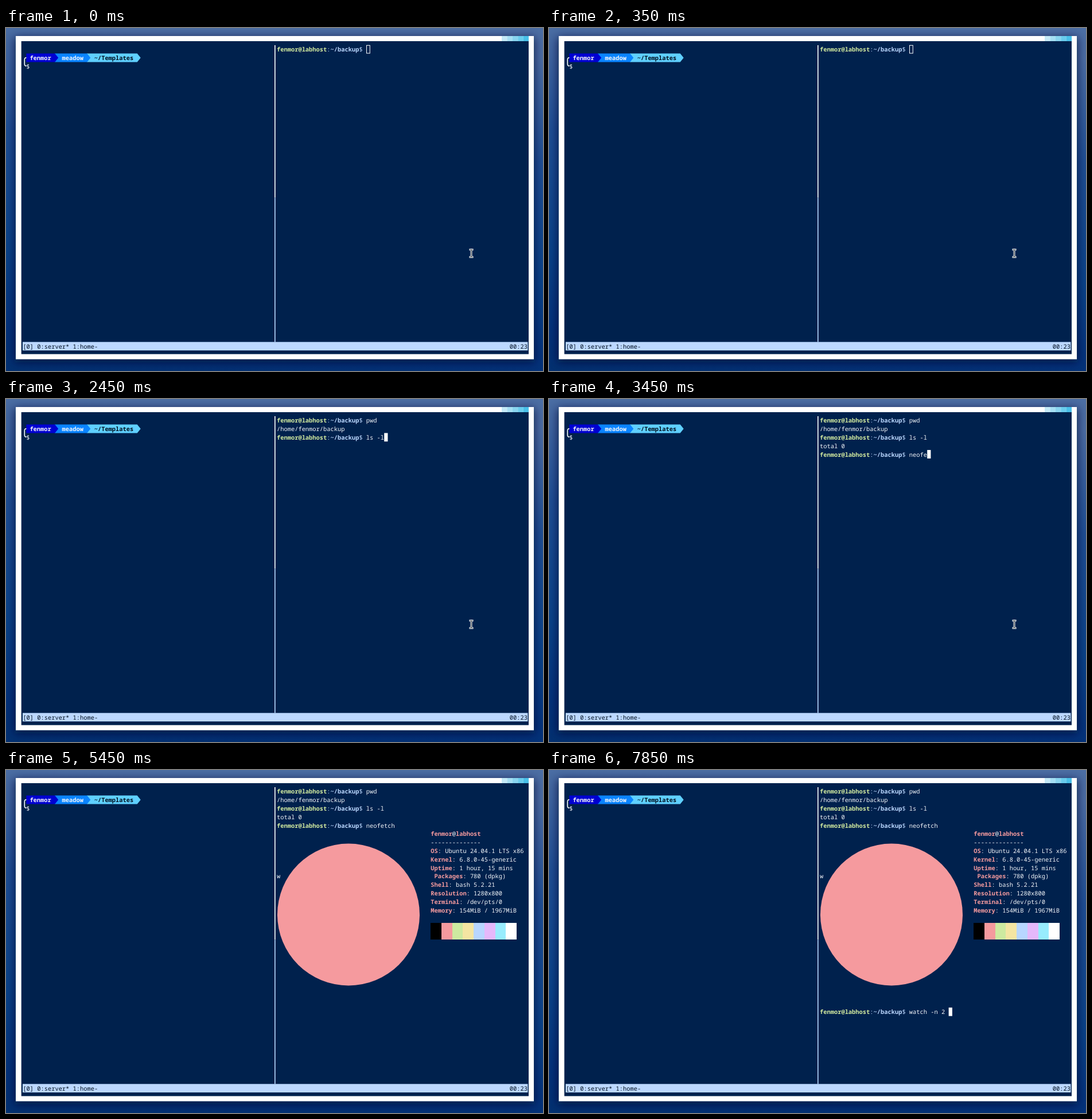
Write an HTML page that moves like this. It is 936x599 px and loops after 8000 ms.

```html
<!DOCTYPE html>
<html lang="en">
<head>
<meta charset="utf-8">
<title>Terminal session</title>
<style>
html, body { margin: 0; width: 100%; height: 100%; overflow: hidden; background: #0a3a80; }
svg { display: block; width: 936px; height: 599px; }
text { white-space: pre; text-rendering: geometricPrecision; }
.mono { font: 10.4px "Noto Sans Mono", monospace; fill: #f4f6fa; }
.b { font-weight: 700; }
.dark { fill: #001020; }
.small { font-size: 5.8px; }
.ui { font: 10.46px "Noto Sans", sans-serif; text-anchor: middle; fill: #46525c; }
</style>
</head>
<body>
<svg viewBox="0 0 936 599" xmlns="http://www.w3.org/2000/svg">
  <defs>
    <linearGradient id="sky" x1=".1" x2="0" y2="1">
      <stop offset="0" stop-color="#4c6ea4"/>
      <stop offset=".3" stop-color="#1f4f94"/>
      <stop offset=".65" stop-color="#0a4388"/>
      <stop offset=".88" stop-color="#04327a"/>
      <stop offset="1" stop-color="#033070"/>
    </linearGradient>
    <filter id="soft" x="-10%" y="-10%" width="120%" height="120%"><feGaussianBlur stdDeviation="8"/></filter>
  </defs>

  <rect width="936" height="599" fill="url(#sky)"/>
  <rect x="15" y="16" width="907" height="568" fill="#001030" opacity=".7" filter="url(#soft)"/>
  <rect x="17" y="14" width="903" height="564.5" fill="#fff"/>
  <g id="strip"></g>

  <g id="term">
    <rect x="26.7" y="23" width="884.3" height="546.5" fill="#00214d"/>
    <rect x="468" y="30" width="1.6" height="266.5" fill="#fff"/>
    <rect x="468" y="296.5" width="1.6" height="252" fill="#bcd8ff"/>
    <path d="M141 44.6h87.7l6 7.4-6 7.4H141Z" fill="#5fd0ff"/>
    <path d="M85 44.6h56.3l6 7.4-6 7.4H85Z" fill="#0a84ff"/>
    <path d="M35.3 44.6h49.9l6 7.4-6 7.4H35.3Z" fill="#0000d2"/>
    <path d="M35.5 51.8q-3.2 0-3.2 3.6v7.4q0 3.6 3.2 3.6" fill="none" stroke="#fff" stroke-width="1.6"/>
    <g class="mono">
      <text class="b" x="41.4" y="56.2">fenmor</text>
      <text class="b" x="97.5" y="56.2">meadow</text>
      <text class="b dark" x="153.7" y="56.2">~/Templates</text>
      <text x="35.2" y="71">$</text>
    </g>
    <rect x="29" y="548.3" width="880.5" height="14.8" fill="#bcd8ff"/>
    <g class="mono dark">
      <text x="29.3" y="560">[0] 0:server* 1:home-</text>
      <text x="877.8" y="560">00:23</text>
    </g>
    <g id="pane" class="mono"></g>
  </g>

  <g id="switcher">
    <rect x="17" y="14" width="903" height="564.5" rx="2" fill="#4dbfe9" opacity=".5"/>
    <rect x="18" y="15" width="901" height="562.5" rx="2" fill="none" stroke="#4dbfe9" stroke-width="2"/>
    <rect x="326.8" y="193.5" width="520" height="286.5" rx="7" fill="#fff" stroke="#4db5dd"/>
    <rect x="338" y="205" width="247" height="247" fill="#fcfcfd"/>
    <rect x="588" y="205" width="247.5" height="247" rx="2" fill="#4dbfe9"/>
    <rect x="386" y="208" width="149.3" height="225" fill="#00214d"/>
    <g id="log" class="mono small"></g>
    <rect x="386" y="424" width="3.6" height="8.2" fill="#fff"/>
    <use href="#term" transform="translate(599 251) scale(.2545) translate(-27 -23)"/>
    <rect x="446.5" y="400" width="29" height="29" fill="#0c0a0c"/>
    <rect x="697" y="400" width="29" height="29" fill="#0c0a0c"/>
    <g class="ui">
      <text x="461" y="446">kitty</text>
      <text x="711.5" y="446" style="fill:#fff">kitty</text>
      <text x="586" y="465.5">recordmydesktop --x=210 --y=113 --width=1195 --height=757</text>
    </g>
  </g>

  <g id="pointer" fill="none" stroke-linecap="square">
    <path id="beam" d="M809 387h1.2l.8.8.8-.8h1.2M811 388v11M809 400h1.2l.8-.8.8.8h1.2" stroke="#fff" stroke-width="3"/>
    <path d="M809 387h1.2l.8.8.8-.8h1.2M811 388v11M809 400h1.2l.8-.8.8.8h1.2" stroke="#101820"/>
  </g>
</svg>
<script>
const LOOP = 8000, CELL = 6.24, LINE = 14.81, LEFT = 472, TOP = 29.8;
const SWITCHER_IN = 200, SWITCHER_OUT = 350, FOCUS = 450, POINTER_OUT = 3850;
const PINK = '#f59a9e', LIME = '#d3eba0', SKY = '#bcd8ff';
const USER = 'fenmor', HOST = 'labhost';
const $ = id => document.getElementById(id);

const colX = col => LEFT + col * CELL;
const rowY = row => TOP + row * LINE;
const rect = (x, y, w, h, fill, more = '') =>
  `<rect x="${x}" y="${y}" width="${w}" height="${h}" fill="${fill}" ${more}/>`;
const span = (s, color, bold) =>
  `<tspan ${bold ? 'class="b"' : ''} style="fill:${color}">${s}</tspan>`;
const line = (col, row, body) => `<text x="${colX(col)}" y="${rowY(row) + 11.5}">${body}</text>`;

const PROMPT = span(`${USER}@${HOST}`, LIME, true) + span(':', SKY) +
  span('~/backup', SKY, true) + span('$ ', SKY);
const PROMPT_LENGTH = USER.length + HOST.length + 12;

const commands = [
  { row: 0, at: 0, text: 'pwd', keys: [1000, 1100, 1200], enter: 1550 },
  { row: 2, at: 1600, text: 'ls -l', keys: [1800, 1900, 2050, 2250, 2450], enter: 2700 },
  { row: 4, at: 2750, text: 'neofetch', keys: [3150, 3200, 3300, 3350, 3450, 3500, 3550, 3650], enter: 3750 },
  { row: 26, at: 5600, text: 'watch -n 2 ', enter: Infinity,
    keys: [5850, 6150, 6250, 6400, 6600, 6800, 6950, 7150, 7200, 7600, 7800] },
];

const info = (row, at, label, value, shift = 0) =>
  ({ at, draw: line(43 + shift, row, span(label, PINK, true) + ': ' + value) });

const palette = ['#000', PINK, '#cdeaa0', '#f4e5a2', '#b8d6ff', '#e5b8fa', '#98ecfd', '#fff'];
const swatch = (color, i) =>
  rect(colX(43 + 3 * i), rowY(16), 3 * CELL, 2 * LINE, color, 'shape-rendering="crispEdges"');

const outputs = [
  { at: 1600, draw: line(0, 1, `/home/${USER}/backup`) },
  { at: 2700, draw: line(0, 3, 'total 0') },
  { at: 3850, draw: `<circle cx="597" cy="252.5" r="124" fill="${PINK}"/>` },
  { at: 4150, draw: line(43, 5, span(USER, PINK, true) + '@' + span(HOST, PINK, true)) },
  { at: 4200, draw: line(43, 6, '-'.repeat(USER.length + HOST.length + 1)) },
  info(7, 4300, 'OS', 'Ubuntu 24.04.1 LTS x86'),
  info(8, 4400, 'Kernel', '6.8.0-45-generic'),
  info(9, 4550, 'Uptime', '1 hour, 15 mins'),
  { at: 4850, draw: line(0, 10, 'w') },
  info(10, 5000, 'Packages', '780 (dpkg)', 1),
  info(11, 5100, 'Shell', 'bash 5.2.21'),
  info(12, 5250, 'Resolution', '1280x800'),
  info(13, 5400, 'Terminal', '/dev/pts/0'),
  info(14, 5450, 'Memory', '154MiB / 1967MiB'),
  { at: 5450, draw: palette.map(swatch).join('') },
];

function cursor(t, col, row) {
  const x = colX(col), y = rowY(row);
  if (t < FOCUS) return rect(x + .5, y + .5, CELL - .5, LINE - 1, 'none', 'stroke="#fff"');
  return t >= 850 && t < 1000 ? '' : rect(x, y, CELL, LINE, '#fff');
}

function drawCommand(c, t) {
  const typed = c.keys.filter(k => k <= t).length;
  const caret = t < c.enter ? cursor(t, PROMPT_LENGTH + typed, c.row) : '';
  return line(0, c.row, PROMPT + c.text.slice(0, typed)) + caret;
}

let shown = '';
function render(t) {
  const pane = outputs.filter(o => o.at <= t).map(o => o.draw).join('') +
    commands.filter(c => c.at <= t).map(c => drawCommand(c, t)).join('');
  if (pane !== shown) $('pane').innerHTML = shown = pane;
  const switching = t >= SWITCHER_IN && t < SWITCHER_OUT;
  $('switcher').setAttribute('opacity', !switching ? 0 : t < SWITCHER_IN + 50 ? .5 : 1);
  $('pointer').setAttribute('opacity', t < POINTER_OUT ? 1 : 0);
}

const refused = ['X Error: BadAccess (attempt to access priva', 'te resource denied)',
  'Bad Access on XGrabKey.', 'Shortcut already assigned.'];
const log = ['(though that is not advised, since it will', 'probably produce faulty results).', '',
  'Initializing...', 'Buffer size adjusted to 4096 from 4096 fram', 'es.', 'Opened PCM device default',
  'Recording on device default is set to:', '1 channels at 22050Hz',
  ...refused, ...refused, ...refused, ...refused, 'Capturing!'];
$('log').innerHTML = log.map((s, i) => `<text x="386.3" y="${215.8 + i * 8.24}">${s}</text>`).join('');

$('strip').innerHTML = ['#c4e9f7', '#a5def3', '#88d4ef', '#69cbec', '#48bfe8']
  .map((c, i) => rect(864 + i * 9.4, 14, 9.5, 9, c)).join('');

const start = performance.now();
function tick() {
  render((performance.now() - start) % LOOP);
  requestAnimationFrame(tick);
}
render(0);
requestAnimationFrame(tick);
</script>
</body>
</html>
```
